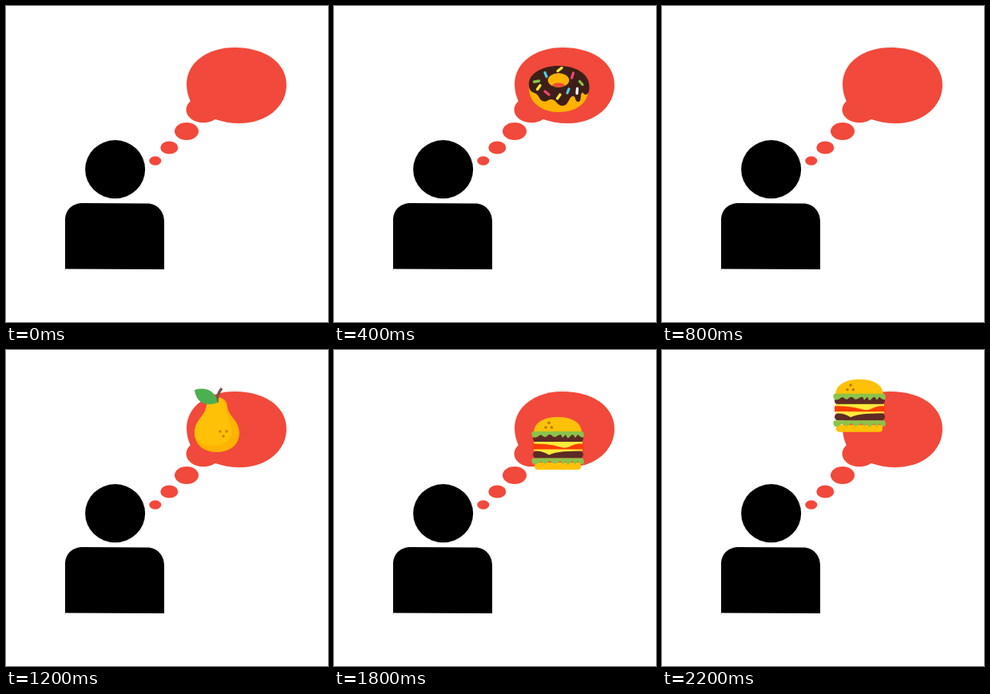
An HTML page for the animation above (2300 ms loop, 403 px wide and 396 px high).

```html
<!DOCTYPE html>
<html lang="en">
<head>
<meta charset="utf-8">
<title>Food thoughts</title>
<style>
  html, body { margin: 0; width: 100%; height: 100%; overflow: hidden; background: #fff; }
  svg { display: block; width: 100vw; height: 100vh; }
  .sprinkles path { fill: none; stroke-width: 3.3; stroke-linecap: round; }
</style>
</head>
<body>
<svg viewBox="0 0 403 396">
  <!-- person -->
  <ellipse cx="136.6" cy="204.7" rx="37.5" ry="36.6"/>
  <path d="M74 329.5V269C74 255 83 247 97 247L177 247.5C189 247.5 198 257 198 270V330Z"/>

  <!-- thought bubble -->
  <g fill="#f1493b">
    <path d="M226 98C226 71 252 52 286 52C324 52 351 71 351 99C351 126 326 147 292 147C281 147 271 145 262 142L231 120C228 113 226 106 226 98Z"/>
    <ellipse cx="247" cy="130" rx="21.5" ry="16.2"/>
    <ellipse cx="226" cy="157" rx="15" ry="11"/>
    <ellipse cx="204.3" cy="177.5" rx="11" ry="8"/>
    <ellipse cx="186.8" cy="194" rx="7.6" ry="5.7"/>
  </g>

  <g id="donut">
    <path fill="#ffb300" d="M244 103C244 89 261 80 281 80C302 80 318 90 318 106C318 122 302 133 281 133C260 133 244 121 244 103Z"/>
    <path fill="#3e1f18" d="M244 99C243 85 260 75 281 75C303 75 319 85 319.500 100C320 107 318 111 315 111C312 111 312 107 310 109C308 112 310 121 305 120C301 119 303 113 299 113C294 113 294 125 286 125C279 125 278 117 272 117C267 117 267 121 261 119C256 117 257 111 251 109C247 108 244 105 244 99Z"/>
    <ellipse cx="281" cy="93" rx="13.300" ry="9"/>
    <ellipse cx="281" cy="93" rx="13.300" ry="9" fill="#ffb300"/>
    <path fill="#f1493b" d="M273 99.500C275 95 287 95 289 99.500C285 102.500 277 102.500 273 99.500Z"/>
    <g class="sprinkles">
      <path stroke="#4dd0e1" d="M264 83.500l2 5M294 104l-2 5"/>
      <path stroke="#ffeb3b" d="M285 77.500l-5 4M258 99.500l-3.500 5M283 111l-3.500 5"/>
      <path stroke="#f0437c" d="M299.500 84l-2 6M264 107l5 4"/>
      <path stroke="#8bc34a" d="M250.500 95l6-1M307.500 94.500l3.500 4"/>
      <path stroke="#fff" d="M304.500 103.500l-.5 6"/>
    </g>
  </g>

  <g id="pear">
    <path fill="#ffb300" d="M264 59C271 59 276 63 277 70C278 84 292 87 292 104C292 119 280 128 264 128C248 128 236 119 236 104C236 87 249 84 251 70C252 63 257 59 264 59Z"/>
    <path fill="#ffc107" d="M261 60C268 59 273 63 274 70C275 83 282 88 282 102C282 114 272 120 260 120C249 120 241 116 236.500 109C234 88 249 84 251 70C252 64 256 60.500 261 60Z"/>
    <path fill="none" stroke="#795548" stroke-width="3.500" d="M264 66C264 59 266 53 270 48"/>
    <path fill="#4caf50" d="M236 50C249 46 262 50 265 66C251 71 238 67 236 50Z"/>
    <g fill="#d58200">
      <circle cx="268" cy="102" r="1.800"/>
      <circle cx="276" cy="102" r="1.800"/>
      <circle cx="272" cy="108" r="1.800"/>
    </g>
  </g>

  <g id="burger">
    <path fill="#ffc107" d="M250 104C250 91 262 84 280 84C298 84 310 91 310 104Z"/>
    <g fill="#b87800">
      <circle cx="269" cy="91.300" r="1.800"/>
      <circle cx="265" cy="97" r="1.800"/>
      <circle cx="272.300" cy="97" r="1.800"/>
    </g>
    <rect x="249" y="106" width="63" height="9.500" rx="4.500" fill="#5d2b25"/>
    <path id="lettuce" fill="#8bc34a" d="M250 102H310C313 102 313 106 312.500 109C309 111 307 107 305 106L302 110L299 106C296 106 295 111 292 110L290 106L286 110L284 106C280 106 279 109 276 109C273 109 272 105 269 106L265 109C261 109 260 105 257 107C254 110 250 111 248 108C247 105 247 102 250 102Z"/>
    <rect x="250" y="115" width="61" height="4" fill="#ffeb3b"/>
    <path fill="#ff3d00" d="M249 117.500H312V124.500H249Z"/>
    <path fill="#ffeb3b" d="M255 115.500H309L303 118C297 119 294 122.500 289 122.500C283 122.500 277 118 255 117.500Z"/>
    <rect x="249" y="126.500" width="63" height="9" rx="4.500" fill="#5d2b25"/>
    <path fill="#ffeb3b" d="M250 124.500H311V126.500C293 126.500 279 127 269 131.500C263 128 260 126.500 250 126.500Z"/>
    <path fill="#ffc107" d="M251 141H309V146C309 149 307 150 304 150H256C253 150 251 149 251 146Z"/>
    <use href="#lettuce" y="33.500"/>
  </g>
</svg>
<script>
const STEP = 100, LOOP = 2300;

// Each food is drawn at its pose for step `at` and drifts by (dx, dy) per step.
const foods = [
  { id: 'donut', first: 1, last: 7, at: 4, dx: -10.3, dy: -12.6 },
  { id: 'pear', first: 9, last: 14, at: 12, dx: -12.5, dy: -15 },
  { id: 'burger', first: 16, last: 22, at: 18, dx: -8.25, dy: -11.8 }
].map(food => ({ ...food, el: document.getElementById(food.id) }));

function draw(now) {
  const step = Math.floor((now % LOOP) / STEP);
  for (const { el, first, last, at, dx, dy } of foods) {
    const k = step - at;
    el.setAttribute('visibility', step >= first && step <= last ? 'visible' : 'hidden');
    el.setAttribute('transform', `translate(${k * dx} ${k * dy})`);
  }
}

const start = performance.now();
function tick() {
  draw(performance.now() - start);
  requestAnimationFrame(tick);
}
tick();
</script>
</body>
</html>
```
